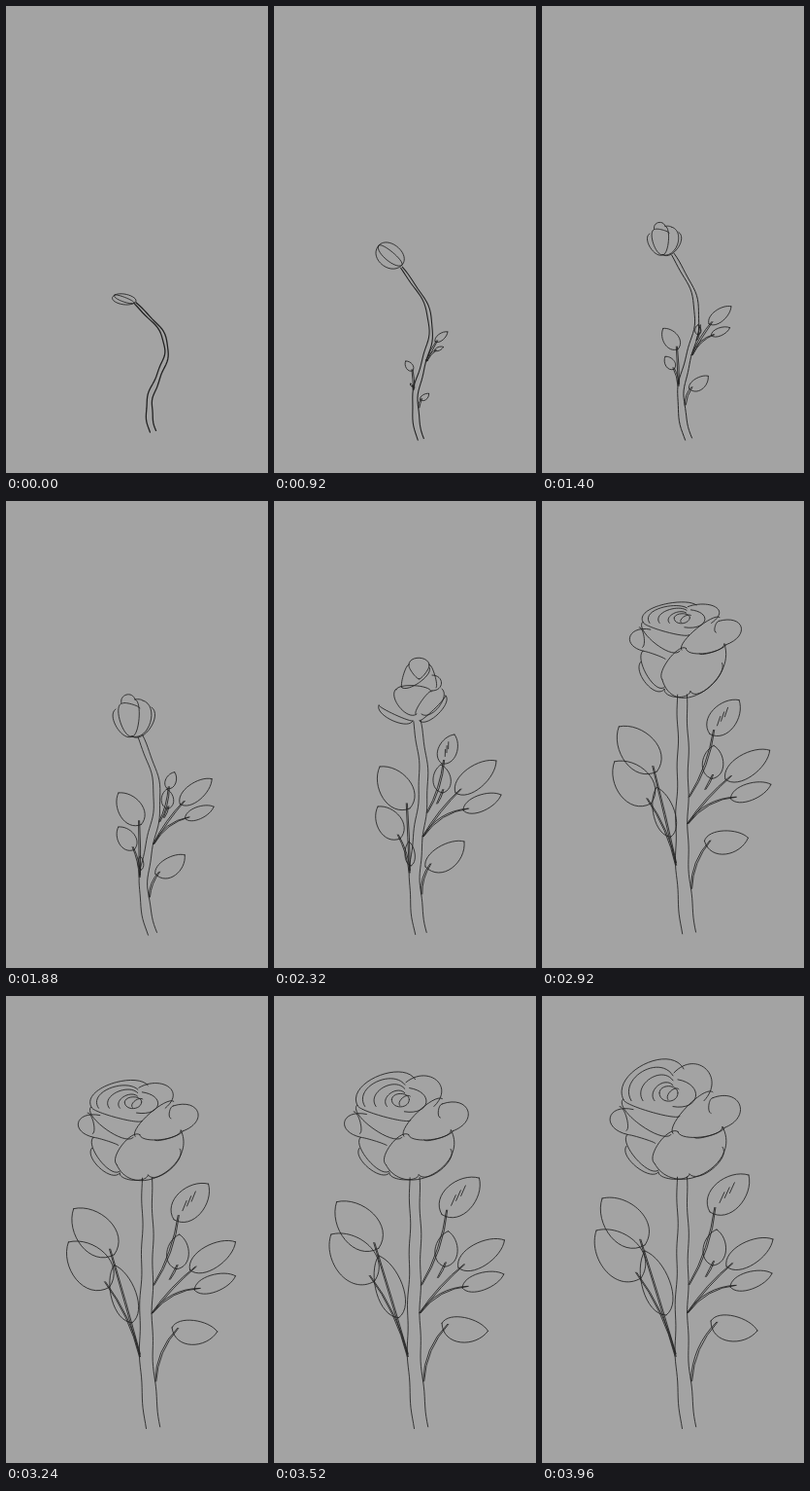
An HTML page with a canvas that plays this animation: 270 px wide and 480 px high, repeating every 4 s.

```html
<!DOCTYPE html>
<html lang="en">
<head>
<meta charset="utf-8">
<title>Growing rose</title>
<style>
html, body { margin: 0; height: 100%; overflow: hidden; background: #a3a3a3; }
canvas { display: block; width: 100vw; height: 100vh; }
</style>
</head>
<body>
<canvas id="stage" width="270" height="480"></canvas>
<script>
const ctx = document.getElementById('stage').getContext('2d');
const LOOP = 4000, STEP = 40, HALF_GROWN = 2320, GROWN = 3960;

const mix = (a, b, k) => a + (b - a) * k;
const mixAll = (a, b, k) => a.map((v, i) => mix(v, b[i], k));
const ramp = (t, from, to) => Math.min(1, Math.max(0, (t - from) / (to - from)));
const smooth = (t, from, to) => { const k = ramp(t, from, to); return k * k * (3 - 2 * k); };

// Key poses: time, neck x and y, bloom left, right and height
const poses = [
  [0, 133, 306, 112, 133, 10],
  [920, 131, 269, 108, 133, 24],
  [1880, 138, 242, 112, 152, 44],
  [2320, 147, 226, 108, 178, 66],
  [2920, 144, 199, 88, 200, 95],
  [3240, 145, 187, 73, 194, 100],
  [3960, 144, 186, 69, 201, 120]
];

function poseAt(t) {
  const i = Math.max(1, poses.findIndex(p => t <= p[0]));
  const a = poses[i - 1], b = poses[i];
  const [, x, y, left, right, height] = mixAll(a, b, ramp(t, a[0], b[0]));
  return { x, y, left, right, height };
}

// The stem is a line from neck to ground plus two sine bends that straighten out
function stemAt(t) {
  const neck = poseAt(t), ground = mix(440, 449, ramp(t, 0, 900));
  const bow = mix(18, -4, smooth(t, 300, 3100));
  const sway = mix(12, 2, smooth(t, 1500, 2900));
  const thickness = mix(1, 5, smooth(t, 900, 3200));
  const centre = u => [
    mix(neck.x, 152, u) + bow * Math.sin(Math.PI * u) + sway * Math.sin(2 * Math.PI * u),
    mix(neck.y, ground, u)];
  return (u, side) => {
    const [x, y] = centre(u), [x2, y2] = centre(u + .01);
    const len = Math.hypot(x2 - x, y2 - y);
    const half = side * (thickness + 2.5 * u + .6 * Math.sin(u * 31 + side));
    return [x + (y2 - y) / len * half, y - (x2 - x) / len * half];
  };
}

function drawStem(stem, t) {
  ctx.lineWidth = mix(1.3, .85, ramp(t, 0, 1880));
  ctx.beginPath();
  for (const side of [-1, 1]) {
    ctx.moveTo(...stem(0, side));
    for (let u = .02; u <= 1; u += .02) ctx.lineTo(...stem(u, side));
  }
  ctx.stroke();
}

// Each pose of a leaf: tip x and y, base x and y; ratio is half width over length
const leaves = [
  { born: 1300, joint: .42, side: 1, ratio: .3, bend: -.1, veins: true,
    half: [186, 240, 173, 270], open: [213, 184, 173, 222] },
  { born: 900, joint: .53, side: 1, ratio: .32, reach: .3,
    half: [172, 271, 174, 300], open: [180, 240, 176, 277] },
  { born: 300, joint: .53, side: 1, ratio: .22, bend: .08,
    half: [229, 267, 187, 300], open: [238, 250, 190, 278] },
  { born: 500, joint: .53, side: 1, ratio: .2, bend: .25,
    half: [234, 302, 195, 318], open: [237, 285, 194, 299] },
  { born: 500, joint: .8, side: 1, ratio: .27, bend: .2, skew: .25,
    half: [196, 350, 156, 376], open: [222, 344, 174, 334] },
  { born: 500, joint: .69, side: -1, ratio: .31,
    half: [109, 273, 140, 316], open: [62, 208, 106, 256] },
  { born: 800, joint: .7, side: -1, ratio: .32, bend: -.1,
    half: [107, 314, 130, 347], open: [56, 241, 102, 290] },
  { born: 1300, joint: .69, side: -1, ratio: .21, reach: 0,
    half: [139, 350, 141, 375], open: [106, 262, 128, 328] }
];

function drawLeaf(leaf, stem, t) {
  if (t <= leaf.born) return;
  const { bend = 0, skew = 0, reach = 1 } = leaf;
  const joint = stem(leaf.joint, leaf.side);
  const [tx, ty, bx, by] = t < HALF_GROWN
    ? mixAll([...joint, ...joint], leaf.half, ramp(t, leaf.born, HALF_GROWN))
    : mixAll(leaf.half, leaf.open, 1 - (1 - ramp(t, HALF_GROWN, GROWN)) ** 2.2);
  const dx = tx - bx, dy = ty - by;
  // Point at a share of the length, shifted sideways by another share
  const at = (along, across) =>
    [bx + dx * along - dy * across, by + dy * along + dx * across];
  ctx.beginPath();
  for (const side of [-1, 1]) {
    const half = leaf.ratio * (side + skew);
    ctx.moveTo(bx, by);
    ctx.bezierCurveTo(...at(.1, half * 1.45), ...at(.8, half * 1.2), tx, ty);
  }
  if (reach) {
    const [sx, sy] = at(.12, 0);
    const [ex, ey] = mixAll([sx, sy], joint, reach);
    const cx = (sx + ex) / 2 - (ey - sy) * bend, cy = (sy + ey) / 2 + (ex - sx) * bend;
    for (const gap of [0, 2.2]) {
      ctx.moveTo(sx + gap / 2, sy);
      ctx.quadraticCurveTo(cx + gap, cy + gap / 2, ex + gap / 2, ey);
    }
  }
  if (leaf.veins && t > 2100) {
    for (const along of [.25, .38, .51]) {
      ctx.moveTo(...at(along, 0));
      ctx.lineTo(...at(along + .2, -.08));
    }
  }
  ctx.stroke();
}

// Blooms are built from arcs: start, end, and bulge as a share of the chord.
// Each frame gives the left, right, top and bottom that the pose stretches.
const blooms = [
  { until: 1400, frame: [108, 133, 246, 271], draw(arc) {
    for (const bulge of [.36, .12, -.2, -.42]) arc(108, 246, 132, 267, bulge);
  } },
  { until: 2100, frame: [112, 152, 198, 242], draw(arc) {
    arc(113, 213, 130, 241, -.27);
    arc(150, 211, 130, 241, .3);
    arc(119, 207, 130, 241, -.2);
    arc(141, 204, 130, 241, .36);
    arc(119, 207, 133, 203, .5);
    arc(133, 203, 141, 204, .1);
    arc(133, 203, 130, 241, .15);
    arc(120, 207, 138, 212, .1);
  } },
  { until: 2600, frame: [108, 178, 160, 226], draw(arc) {
    const both = (x0, y0, x1, y1, bulge) => {
      arc(x0, y0, x1, y1, bulge);
      arc(299 - x0, y0, 299 - x1, y1, -bulge);
    };
    for (const bulge of [-.05, -.22]) {
      arc(108, 209, 143, 225, bulge);
      arc(177, 199, 150, 225, -bulge);
    }
    both(126, 192, 147, 218, -.28);
    both(139, 167, 132, 191, -.1);
    both(139, 167, 150, 182, -.12);
    arc(139, 167, 160, 168, .35);
    arc(131, 190, 160, 170, -.2);
    arc(126, 193, 162, 195, .15);
    arc(163, 178, 163, 194, .6);
    arc(163, 194, 146, 218, -.1);
  } },
  { until: LOOP, frame: [69, 201, 66, 187], open: true, draw(arc) {
    // Back petals and nested heart
    arc(84, 106, 146, 74, .33);
    arc(136, 78, 167, 107, .6);
    for (let i = 0; i < 3; i++) arc(92 + 12 * i, 107, 135, 81 + 5 * i, .4);
    arc(140, 85, 135, 113, .75);
    arc(121, 99, 140, 99, .38);
    arc(121, 99, 140, 99, -.45);
    arc(130, 106, 141, 95, .3);
    // Side petals with curled rims
    arc(84, 106, 142, 123, -.07);
    arc(83, 106, 133, 142, -.17);
    arc(94, 116, 88, 142, -.8);
    arc(88, 142, 117, 151, .03);
    arc(80, 113, 87, 138, .15);
    arc(176, 104, 188, 135, .7);
    arc(188, 135, 157, 145, .1);
    arc(176, 104, 174, 120, -.2);
    arc(176, 98, 135, 141, -.15);
    // Front petal, cup and sepals
    arc(116, 172, 140, 139, .22);
    arc(140, 139, 186, 134, -.18);
    arc(116, 172, 186, 134, -.42);
    arc(88, 142, 120, 179, -.2);
    arc(87, 154, 120, 181, -.24);
    arc(186, 155, 152, 183, .25);
    arc(120, 181, 152, 183, -.2);
  } }
];

function drawBloom(t) {
  const bloom = blooms.find(b => t < b.until);
  const [l, r, top, bottom] = bloom.frame, pose = poseAt(t);
  const tilt = bloom.open ? (1 - ramp(t, 2920, GROWN)) ** 2 : 0;
  const place = (x, y) => {
    const depth = (y - top) / (bottom - top);
    const v = Math.sign(depth) * Math.abs(depth) ** (1 + .42 * tilt);
    return [mix(pose.left, pose.right, (x - l) / (r - l)) + 6 * tilt * (1 - 2 * v),
      pose.y + 1 - pose.height * (1 - v)];
  };
  ctx.beginPath();
  bloom.draw((x0, y0, x1, y1, bulge) => {
    const nx = (y1 - y0) * bulge * 4 / 3, ny = (x0 - x1) * bulge * 4 / 3;
    ctx.moveTo(...place(x0, y0));
    ctx.bezierCurveTo(...place(x0 + nx, y0 + ny), ...place(x1 + nx, y1 + ny), ...place(x1, y1));
  });
  ctx.stroke();
}

function frame() {
  const t = Math.floor(performance.now() % LOOP / STEP) * STEP;
  const stem = stemAt(t);
  ctx.fillStyle = '#a3a3a3';
  ctx.fillRect(0, 0, 270, 480);
  ctx.strokeStyle = '#222';
  ctx.lineCap = ctx.lineJoin = 'round';
  drawStem(stem, t);
  ctx.lineWidth = .85;
  for (const leaf of leaves) drawLeaf(leaf, stem, t);
  drawBloom(t);
  requestAnimationFrame(frame);
}
frame();
</script>
</body>
</html>
```
